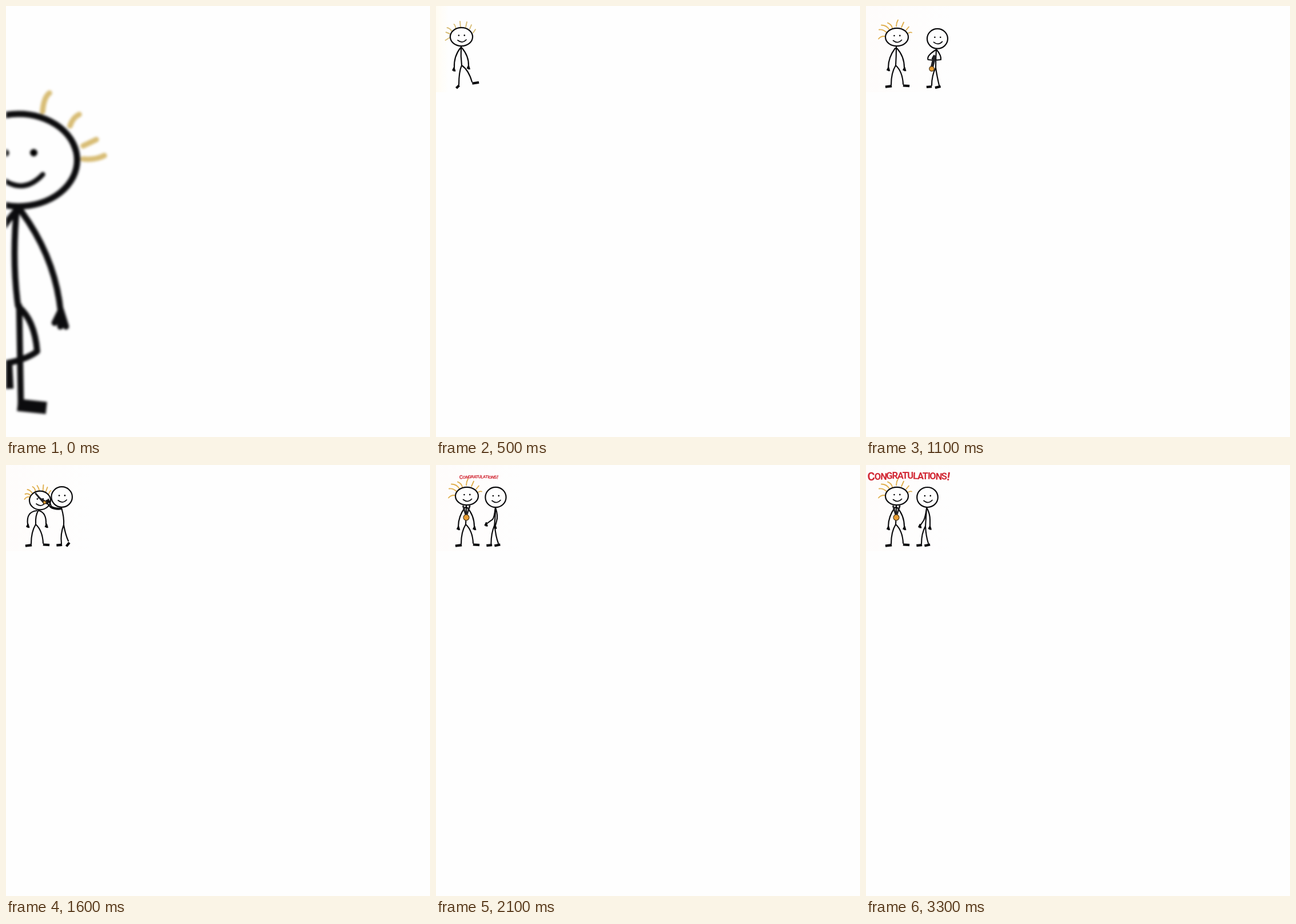
Animation, 742 px wide and 755 px high, one loop 3.8 s. Source, as an HTML page:

```html
<!DOCTYPE html>
<html lang="en">
<head>
<meta charset="utf-8">
<title>Congratulations</title>
<style>
  html, body { margin: 0; width: 100%; height: 100%; overflow: hidden; background: #fefefe; }
  svg { display: block; position: absolute; left: 0; top: 0; overflow: hidden; }
  path, ellipse, circle { stroke-linecap: round; stroke-linejoin: round; }
  .ink { fill: none; stroke: #0c0c0e; stroke-width: 2.15; }
  .head { fill: #fefefe; stroke: #0c0c0e; stroke-width: 2.2; }
  .mouth { fill: none; stroke: #0c0c0e; stroke-width: 1.7; }
  .hair { fill: none; stroke: var(--hair); stroke-width: 1.9; }
  .feet { fill: none; stroke: #0c0c0e; stroke-width: 4.3; stroke-linecap: square; }
  .ribbon { fill: none; stroke: #222226; stroke-width: 2.9; }
  .disc { fill: #e89d33; stroke: #4a3414; stroke-width: 1.2; }
  text { font: 700 16.5px Roboto, "Open Sans", sans-serif; letter-spacing: -1.25px; fill: #d22a36; }
  .big { font-size: 20px; }
</style>
</head>
<body>
<svg id="scene" viewBox="0 0 148.4 151"></svg>
<script>
const scene = document.getElementById('scene');
const NUM = /-?\d*\.?\d+/g;
const LOOP = 3800, STEP = 100, LAST = 33;

// Hair is relative to the head centre; everything else uses scene units.
const hop = {
  head: '4.4 54 20.5 16.2',
  hair: 'M8.4-17Q8.8-22 10.8-23.5M18-12Q19-15 21.2-16M22.6-5L27.2-7.2M22.6-.4Q27 0 30-1.6' +
        'M-8-16L-10-23M-15-12L-21-18M-19-6L-27-9M-20 0L-28 4',
  body: 'M3.8 70.4Q2 89 4.2 105M3.6 71.6Q-9 86-10 106M5.4 72Q17 88 19 106' +
        'M4.4 105.4Q10 110 10.9 121Q7 124-1 125.4M4.6 105L5.2 139',
  feet: 'M.2 128L.4 132M6.2 140L12 140.6',
  hands: '-10 106 19.2 106.5'
};
const stride = {
  head: '44.5 54 19.6 16.1',
  hair: 'M20.5-7L24.5-13M14.5-14L17.5-21M7.5-17L9.5-26M-1.5-16L-2.5-27M-10-15Q-11-21-13-22' +
        'M-17-10Q-20-15-25-16M-19.5-5L-27-8M-20 1L-28 6',
  body: 'M44 71Q43 88 45 104M43 73Q31 88 32 108M45 73Q58 88 57 106' +
        'M45 104Q40 115 40 138M45 104Q57 112 63 133',
  feet: 'M37 142.5L39 140.5M65.5 135.3L73 134.2',
  hands: '31.5 108 57 104.5'
};
const stand = {
  head: '54 54.5 20 15.7',
  hair: 'M20-7Q24-9 26-8M16-12L21-18M8-17L12-26M-1-19Q-1-25 2-30M-8-16Q-9-22-16-25' +
        'M-13-13Q-18-21-27-21M-18-8Q-24-14-31-13M-19-1Q-27-3-32 3',
  body: 'M53 71Q53 88 52 104M51 74Q39 90 39 108M54 74Q67 88 67 108' +
        'M52 104Q44 117 44 138M52 104Q64 115 65 137',
  feet: 'M36 141.3L43 140.5M67 139.6L74 140',
  hands: '39.3 107.5 67.5 107.5'
};
const bow = {
  ...stand,
  head: '59.5 62 18.5 16.3',
  hair: 'M15-11Q17-16 19-17M10-15L13-23M5-16L6-27M-1-16Q-2-22-5-26M-8-15Q-8-21-13-24' +
        'M-13-12Q-17-18-22-19M-17-9Q-21-13-26-11M-18-6Q-24-7-27-2',
  body: 'M57 79Q51 88 52 104M54 80Q35 82 38 104M58 80Q71 84 70 104' +
        'M52 104Q44 117 44 138M52 104Q64 115 65 137',
  hands: '38.5 103.5 71 103.5'
};

const carry = {
  head: '125 57.3 18 17.4', hair: '',
  body: 'M123 76Q122 92 122 108M122 77Q106 87 108.5 94L118 95M124 77Q132 87 131 94L121 95' +
        'M122 108Q115 122 115 139M122 108Q124 122 128 139',
  feet: 'M108 141.8L113 141.4M123 142.6L128.5 141.4',
  hands: '118 88 120.5 88'
};
const carryStep = {
  ...carry,
  body: carry.body.replace('115 122 115 139', '113 120 112 137').replace('124 122 128 139', '127 122 132 138'),
  feet: 'M104.5 140.6L110 140M128 142.4L132.5 140.8'
};
const hang = {
  head: '97.7 56 18.3 17.8', hair: '',
  body: 'M97 75Q102 92 101 105M98 77Q86 79 78 74L72 67M97 76Q84 76 79 72L76 63' +
        'M101 105Q95 120 97 138M101 105Q104 122 109 133',
  feet: 'M90.5 140.5L96 140M107 140.8L109.6 137.5',
  hands: '71 62 74 60'
};
const reach = {
  head: '102.5 56.5 18 17.8', hair: '',
  body: 'M103 75Q103 92 101 106M102 76Q101 91 98 94L84 101M103 76Q107 92 102 100L99 104' +
        'M101 105Q96 120 96 138M102 106Q104 125 109 137',
  feet: 'M90.5 140.8L96 140.3M104.5 141L110.5 139.8',
  hands: '83.5 99 98 104'
};
const rest = {
  head: '107.5 56.5 18.3 17.5', hair: '',
  body: 'M106 75Q105 92 104 108M106 76Q104 91 101 97L95 106M107 76Q112 86 112 96L112 107' +
        'M104 107Q97 120 97 138M104 107Q105 125 109 137',
  feet: 'M90.5 140.8L96 140.3M104.5 141L110 139.8',
  hands: '94.5 104 112 107'
};

const held = { ribbon: 'M119 87L114.5 106M121.5 88L117 106', disc: '115 110 4.2' };
const lifted = { ribbon: 'M52 50L66 66M57 57L71 65', disc: '67.5 65.5 2.6' };
const worn = { ribbon: 'M47.5 72L52 87M59 72L54 87', disc: '53 92 5' };

// Keys: step, pose, sideways shift.
const heroKeys = [
  ...[0, 1, 2, 3, 4, 5].map(n => n % 2 ? [n, stride, (n - 5) * 8] : [n, hop, n * 8]),
  [6, stand, 0], [13, stand, 0], [15, bow, 0], [17, bow, 0], [19, stand, 0]
];
const walkIn = [24, 18, 12, 6, 0, -6, -11, -16];
const friendKeys = [
  ...walkIn.map((dx, i) => [7 + i, i % 2 ? carryStep : carry, dx]),
  [16, hang, 0], [17, hang, 0], [19, reach, 0], [24, rest, 0]
];
const medalKeys = [
  ...walkIn.map((dx, i) => [7 + i, held, dx]),
  [16, lifted, 0], [17, lifted, 0], [19, worn, 0]
];

const mix = (a, b, k) => a + (b - a) * k;
const nums = s => (s.match(NUM) || []).map(Number);

function mixText(a, b, k) {
  if (!k || a === b) return a;
  const to = nums(b);
  let i = 0;
  return a.replace(NUM, n => ' ' + mix(+n, to[i++], k).toFixed(2));
}

function poseAt(keys, step) {
  let i = keys.length - 1;
  while (i >= 0 && keys[i][0] > step) i--;
  if (i < 0) return null;
  const [s0, a, x0] = keys[i], [s1, b, x1] = keys[i + 1] || keys[i];
  const k = s1 > s0 ? (step - s0) / (s1 - s0) : 0;
  const pose = { dx: mix(x0, x1, k) };
  for (const part in a) pose[part] = mixText(a[part], b[part], k);
  return pose;
}

const path = (cls, d) => `<path class="${cls}" d="${d}"/>`;
const shift = (x, y, inner) => `<g transform="translate(${x} ${y})">${inner}</g>`;
const hand = (x, y) => shift(x, y, path('ink', 'M0 0L-2.2 4.5M0 0L-.2 5.8M0 0L1.8 5.8'));

function person(p) {
  if (!p) return '';
  const [x, y, rx, ry] = nums(p.head), h = nums(p.hands);
  const face = path('hair', p.hair) +
    `<ellipse class="head" rx="${rx}" ry="${ry}"/>` +
    '<circle cx="-4.6" cy="-2.5" r="1.3"/><circle cx="5.3" cy="-2.6" r="1.3"/>' +
    path('mouth', 'M-6.5 6Q1.5 12.5 8.5 5');
  return shift(p.dx, 0, path('ink', p.body) + path('feet', p.feet) +
    hand(h[0], h[1]) + hand(h[2], h[3]) + shift(x, y, face));
}

function medal(p) {
  if (!p) return '';
  const [x, y, r] = nums(p.disc);
  return shift(p.dx, 0, path('ribbon', p.ribbon) + `<circle class="disc" cx="${x}" cy="${y}" r="${r}"/>`);
}

function banner(step) {
  if (step < 19) return '';
  const k = Math.min(1, (step - 19) / 5);
  return `<g transform="translate(75 ${mix(22, 19, k)}) scale(${mix(.12, 1, k)})">` +
    '<text x="-72" y="8.5" rotate="-4 0 3 -2 0 2 0 -2 2 0 0 2 0 3 -2 8">' +
    '<tspan class="big">C</tspan><tspan dy="-1.5 -.5 -1 -.5 0 0 0 .5 0 0 0 .5 .5 0">ONGRATULATIONS</tspan>' +
    '<tspan class="big" dy="1">!</tspan></text></g>';
}

function draw(step) {
  const zoom = step ? 1 : 5;
  scene.setAttribute('width', 148.4 * zoom);
  scene.setAttribute('height', 151 * zoom);
  scene.style.filter = step ? 'none' : 'blur(2px)';
  scene.style.setProperty('--hair', step < 6 ? '#d8bd76' : '#e0b050');
  scene.style.background = !step ? 'none' : step < 7
    ? 'linear-gradient(90deg, #fffcf3, #fefefe 22px)'
    : 'linear-gradient(90deg, #fefcfb, #fefefe)';
  scene.innerHTML = person(poseAt(heroKeys, step)) + person(poseAt(friendKeys, step)) +
    medal(poseAt(medalKeys, step)) + banner(step);
}

let shown = -1;
function tick() {
  const step = Math.min(LAST, Math.floor(performance.now() % LOOP / STEP));
  if (step !== shown) draw(shown = step);
  requestAnimationFrame(tick);
}
tick();
</script>
</body>
</html>
```
